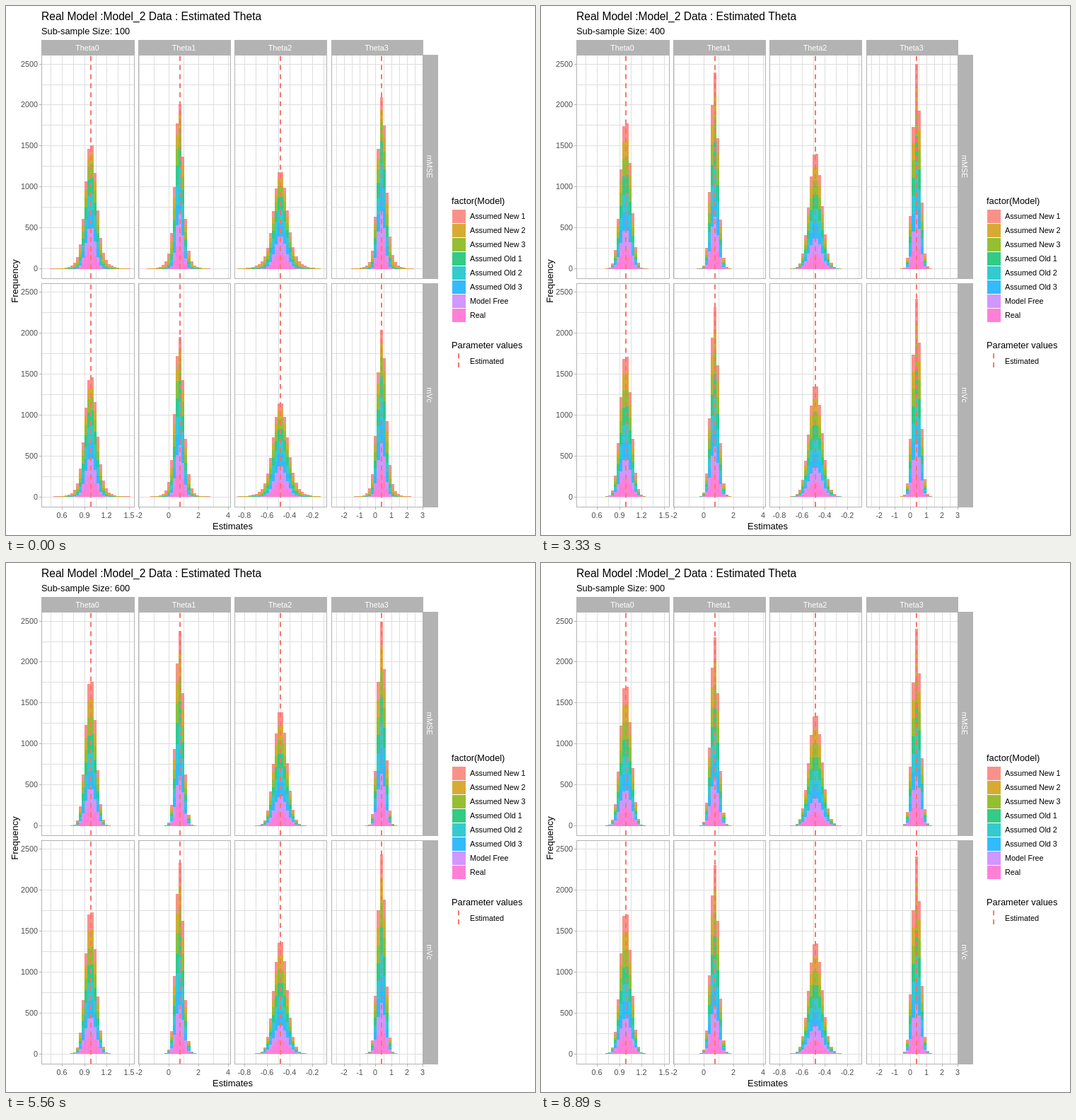
Write an HTML page with a canvas that moves like this. It is 748 px wide and 748 px high and loops after 10 s.

```html
<!DOCTYPE html>
<html lang="en">
<head>
<meta charset="utf-8">
<title>Estimated Theta</title>
<style>
  html, body { margin: 0; width: 100%; height: 100%; overflow: hidden; background: #fff; }
  canvas { display: block; width: 748px; height: 748px; }
</style>
</head>
<body>
<canvas id="c" width="748" height="748"></canvas>
<script>
const ctx = document.getElementById('c').getContext('2d');
const LOOP = 10000, STEPS = 9, BIN = 4.07, PER_COUNT = 0.11577, RUNS = 1000;
const GREY = '#b3b3b3', GRID = '#dedede', RED = '#f8766d';

// extra: how much wider than the others a model is at small sample sizes
const MODELS = [
  { name: 'Assumed New 1', color: '#f8766d', extra: 0.95 },
  { name: 'Assumed New 2', color: '#cd9600', extra: 0.85 },
  { name: 'Assumed New 3', color: '#7cae00', extra: 0.4 },
  { name: 'Assumed Old 1', color: '#00be67', extra: 0.25 },
  { name: 'Assumed Old 2', color: '#00bfc4', extra: 0.2 },
  { name: 'Assumed Old 3', color: '#00a9ff', extra: 0.15 },
  { name: 'Model Free', color: '#c77cff', extra: 0 },
  { name: 'Real', color: '#ff61cc', extra: 0 }
];
// core: relative spread at the first step; tail: weight of the long tails
const ROWS = [
  { name: 'mMSE', top: 69, bottom: 385, zero: 371.5, core: 0.84, tail: 1 },
  { name: 'mVc', top: 392, bottom: 708, zero: 694, core: 0.91, tail: 0.5 }
];
// edge: any bin edge; sd in pixels; drift: shift of the long tails
const COLS = [
  { left: 50, right: 181, mean: 119.6, sd: 7.3, drift: 2, line: 120, edge: 111.3,
    tick: 79, gap: 31.7, first: 0.6, by: 0.3, ticks: 4 },
  { left: 187, right: 317, mean: 245.6, sd: 5.47, drift: -2.5, line: 246, edge: 236.1,
    tick: 188, gap: 42, first: -2, by: 2, ticks: 4 },
  { left: 323, right: 453, mean: 388.2, sd: 9.4, drift: 0, line: 388, edge: 380,
    tick: 337, gap: 32, first: -0.8, by: 0.2, ticks: 4 },
  { left: 460, right: 589, mean: 530.8, sd: 5.27, drift: 3, line: 531, edge: 520.4,
    tick: 478, gap: 22.2, first: -2, by: 1, ticks: 6 }
];

const normal = z => 0.5 + 0.5 * Math.tanh(0.798 * (z + 0.0447 * z ** 3));
const logistic = z => 1 / (1 + Math.exp(-1.3 * z));

function text(str, x, y, size, color, align = 'left', turn = 0) {
  ctx.save();
  ctx.translate(x, y);
  ctx.rotate(turn);
  ctx.font = size + 'px "Liberation Sans", Arial, sans-serif';
  ctx.fillStyle = color;
  ctx.textAlign = align;
  ctx.fillText(str, 0, size * 0.36);
  ctx.restore();
}

function box(x0, y0, x1, y1, color) {
  ctx.fillStyle = color;
  ctx.fillRect(x0, y0, x1 - x0, y1 - y0);
}

function dashed(x, bottom, top) {
  ctx.strokeStyle = RED;
  ctx.lineWidth = 2;
  ctx.setLineDash([7, 5.8]);
  ctx.beginPath();
  ctx.moveTo(x, bottom);
  ctx.lineTo(x, top);
  ctx.stroke();
  ctx.setLineDash([]);
}

function grid(col, row) {
  for (let k = -1; k < 12; k++) {
    const x = Math.round(col.tick + k * col.gap / 2);
    if (x > col.left && x < col.right) box(x, row.top, x + 1, row.bottom, GRID);
  }
  for (let n = 0; n <= 2500; n += 250) {
    const y = Math.round(row.zero - n * PER_COUNT - 0.5);
    box(col.left, y, col.right, y + 1, GRID);
  }
}

// Expected share of estimates of one model that lie below x
function below(x, model, col, row, step) {
  const wide = model.extra * (1 / (1 + step) - 1 / STEPS);
  const heavy = Math.min(1, wide * row.tail);
  const core = row.core + (1 - row.core) * step / (STEPS - 1);
  const z = (x - col.mean - col.drift * heavy) / (col.sd * (core + wide));
  return (1 - heavy) * normal(z) + heavy * logistic(z);
}

function bars(col, row, step) {
  const zero = Math.round(row.zero);
  ctx.globalAlpha = 0.8;
  for (let k = -20; k < 24; k++) {
    const x = col.edge + k * BIN;
    if (x < col.left + 4 || x + BIN > col.right - 4) continue;
    let count = 0, y0 = zero;
    for (const model of [...MODELS].reverse()) {
      count += RUNS * (below(x + BIN, model, col, row, step) - below(x, model, col, row, step));
      const y1 = zero - Math.round(count * PER_COUNT + 0.35);
      if (y1 < y0) box(Math.round(x), y1, Math.round(x + BIN), y0, model.color);
      y0 = y1;
    }
  }
  ctx.globalAlpha = 1;
}

function axes() {
  COLS.forEach((col, c) => {
    box(col.left, 48, col.right + 1, 69, GREY);
    text('Theta' + c, (col.left + col.right) / 2 - 0.5, 59.5, 10.8, '#fff', 'center');
    for (let k = 0; k < col.ticks; k++) {
      const x = Math.round(col.tick + k * col.gap);
      const value = Math.round((col.first + k * col.by) * 10) / 10;
      box(x, 708, x + 1, 712, GREY);
      text(String(value), x, 720, 10.8, '#4d4d4d', 'center');
    }
  });
  for (const row of ROWS) {
    box(589, row.top, 611, row.bottom + 1, GREY);
    text(row.name, 599, (row.top + row.bottom) / 2, 10.8, '#fff', 'center', Math.PI / 2);
    for (let n = 0; n <= 2500; n += 500) {
      const y = Math.round(row.zero - n * PER_COUNT - 0.5);
      box(47, y, 51, y + 1, GREY);
      text(String(n), 45, y + 0.5, 10.8, '#4d4d4d', 'right');
    }
  }
  text('Estimates', 320.5, 735.5, 13, '#000', 'center');
  text('Frequency', 12.5, 389, 13, '#000', 'center', -Math.PI / 2);
}

function legend() {
  text('factor(Model)', 630, 275, 12.8, '#000');
  MODELS.forEach((model, m) => {
    const y = 297 + 20 * m;
    ctx.globalAlpha = 0.8;
    box(631, y - 9, 650, y + 10, model.color);
    ctx.globalAlpha = 1;
    text(model.name, 656, y + 0.5, 10.8, '#000');
  });
  text('Parameter values', 630, 479, 12.8, '#000');
  dashed(640, 511, 490);
  text('Estimated', 656, 502, 10.8, '#000');
}

function draw(step) {
  box(0, 0, 748, 748, '#fff');
  text('Real Model :Model_2 Data : Estimated Theta', 50, 14, 15.6, '#000');
  text('Sub-sample Size: ' + (step + 1) * 100, 50, 35.5, 12.8, '#000');
  for (const row of ROWS) {
    for (const col of COLS) {
      grid(col, row);
      bars(col, row, step);
      dashed(col.line, row.bottom, row.top);
      ctx.strokeStyle = GREY;
      ctx.lineWidth = 1;
      ctx.strokeRect(col.left + 0.5, row.top + 0.5, col.right - col.left, row.bottom - row.top);
    }
  }
  axes();
  legend();
}

let shown = -1;
function frame() {
  // Steps begin at times rounded to 10 ms
  const time = (performance.now() + 5) % LOOP;
  const step = Math.floor(time / LOOP * STEPS);
  if (step !== shown) draw(shown = step);
  requestAnimationFrame(frame);
}
frame();
</script>
</body>
</html>
```
